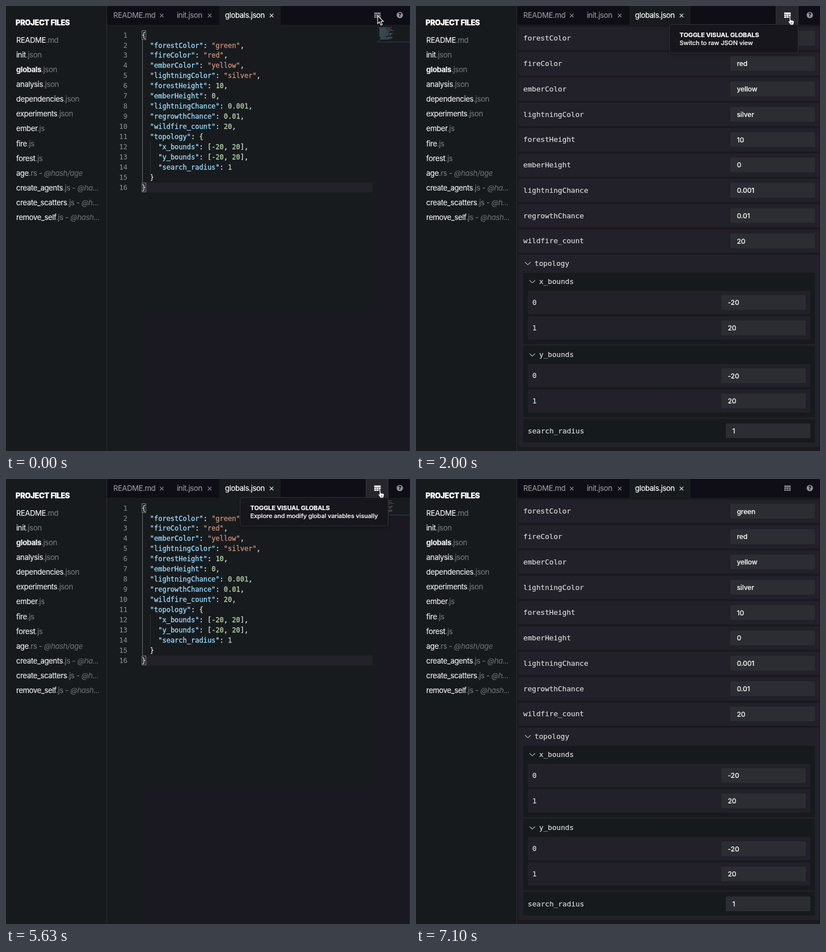
These frames come from a looping animation (712x786 px, 8.43 s). An HTML page:

```html
<!DOCTYPE html>
<html lang="en">
<head>
<meta charset="utf-8">
<title>Visual globals</title>
<style>
html, body { margin: 0; width: 100%; height: 100%; overflow: hidden; background: #161a1d; }
svg { display: block; width: 712px; height: 786px; }
text { font: 13px Inter, sans-serif; letter-spacing: -.3px; white-space: pre; color: #ececee; stroke-width: .2px; }
text, tspan { fill: currentColor; stroke: currentColor; }
.head { font-weight: 800; color: #fff; stroke-width: .4px; }
.bold { font-weight: 700; }
.ext { color: #707477; }
.path { color: #65696c; font-style: italic; }
.tab { color: #929297; }
.on { color: #fff; }
.mono { font: 12.7px "DejaVu Sans Mono", monospace; letter-spacing: 0; color: #d9d9dc; }
.code { font: 12px "DejaVu Sans Mono", monospace; letter-spacing: 0; color: #dcdcdc; stroke-width: .32px; }
.num { color: #82868a; text-anchor: end; stroke-width: .15px; }
.value { font-size: 12px; font-weight: 500; letter-spacing: -.1px; color: #f2f2f3; }
.tip { font-size: 11px; font-weight: 500; letter-spacing: -.12px; color: #f6f6f7; }
.tip.bold { font-weight: 700; color: #fff; }
.help { font-size: 9px; font-weight: 800; letter-spacing: 0; color: #0f0d15; text-anchor: middle; }

.json, .visual, .lines, .blank, .hover, .fade, .arrow, .hand, .cursor {
  animation: 8430ms step-end infinite;
}
.json { animation-name: json; }
.visual { animation-name: visual; }
.lines { animation-name: lines; }
.blank { animation-name: blank; }
.hover, .hand { animation-name: hover; }
.arrow { animation-name: arrow; }
.fade { animation-name: fade; animation-timing-function: linear; }
.cursor { animation-name: move; animation-timing-function: ease-in-out; }

@keyframes json { 0%, 42.705% { opacity: 1 } 16.607%, 67.26%, 100% { opacity: 0 } }
@keyframes visual { 0%, 42.705% { opacity: 0 } 16.607%, 67.26%, 100% { opacity: 1 } }
@keyframes lines { 0%, 43.06%, 100% { opacity: 1 } 42.705% { opacity: 0 } }
@keyframes blank { 0%, 43.06%, 100% { opacity: 0 } 42.705% { opacity: 1 } }
@keyframes hover { 0%, 83.037%, 100% { opacity: 0 } .356% { opacity: 1 } }
@keyframes arrow { 0%, 83.037% { opacity: 1 } .356%, 84.223%, 100% { opacity: 0 } }
@keyframes fade { 0%, .356%, 84.2%, 100% { opacity: 0 } 2.6%, 82.681% { opacity: 1 } }
@keyframes move {
  0% { transform: translate(655px, 17px) }
  5%, 77.936% { transform: translate(659px, 19.5px) }
  78.648%, 82.681% { transform: translate(658px, 18px) }
  84.223%, 100% { transform: translate(690px, -16px) }
}
</style>
</head>
<body>
<svg id="stage" viewBox="0 0 712 786"></svg>
<script>
const rect = (x, y, w, h, fill, more = '') =>
  `<rect x="${x}" y="${y}" width="${w}" height="${h}" fill="${fill}" ${more}/>`;
const text = (x, y, cls, body) => `<text x="${x}" y="${y}" class="${cls}">${body}</text>`;
const span = (cls, body) => `<tspan class="${cls}">${body}</tspan>`;
const line = (d, color, width = 1) => `<path d="${d}" fill="none" stroke="${color}" stroke-width="${width}"/>`;
const group = (cls, body) => `<g class="${cls}">${body}</g>`;

function sidebar() {
  const files = ['README.md', 'init.json', 'globals.json', 'analysis.json', 'dependencies.json',
    'experiments.json', 'ember.js', 'fire.js', 'forest.js', 'age.rs@hash/age',
    'create_agents.js@ha...', 'create_scatters.js@h...', 'remove_self.js@hash...'];
  const rows = files.map((file, i) => {
    const [, name, ext, path] = file.match(/^(\w+)(\.\w+)(@.*)?$/);
    const tail = path ? span('ext', ' - ') + span('path', path) : '';
    return text(18, 64.6 + i * 26.14, '', span(name === 'globals' ? 'bold' : '', name) + span('ext', ext) + tail);
  });
  return rect(0, 0, 177, 786, '#161a1d') + rect(177, 0, 1, 786, '#2c2d32') +
    text(17, 33.8, 'head', 'PROJECT FILES') + rows.join('');
}

function tableIcon(color) {
  let cells = rect(649, 11.5, 11.4, 3, color);
  for (let i = 0; i < 6; i++) {
    cells += rect(649 + i % 3 * 4, 15.3 + Math.floor(i / 3) * 3.2, 3.4, 2.5, color);
  }
  return cells;
}

function tabBar() {
  const tabs = [[189, 'README.md', 274.5], [301, 'init.json', 359], [386, 'globals.json', 468]];
  return rect(178, 0, 534, 33, '#0f0d15') + rect(376, 0, 108, 33, '#171b1e') +
    tabs.map(([x, name, close], i) =>
      text(x, 21, i === 2 ? 'on' : 'tab', name) +
      line(`M${close - 3.2} 13.6l6.4 6.4m0-6.4l-6.4 6.4`, i === 2 ? '#e8e8ea' : '#8c8c92', 1.1)).join('') +
    tableIcon('#85858b') +
    group('hover', rect(634, 0, 40, 33, '#26262c') +
      line('M634.5 0v33M673.5 0v33', '#36363c') + tableIcon('#fff')) +
    '<circle cx="694" cy="16" r="5.6" fill="#919196"/>' + text(694, 19.3, 'help', '?');
}

const source = `{
  "forestColor": "green",
  "fireColor": "red",
  "emberColor": "yellow",
  "lightningColor": "silver",
  "forestHeight": 10,
  "emberHeight": 0,
  "lightningChance": 0.001,
  "regrowthChance": 0.01,
  "wildfire_count": 20,
  "topology": {
    "x_bounds": [-20, 20],
    "y_bounds": [-20, 20],
    "search_radius": 1
  }
}`.split('\n');

function tokens(row) {
  const parts = row.match(/"[^"]*":?|-?\d[\d.]*|[^"\d-]+/g);
  return parts.flatMap(p => {
    if (p.endsWith('":')) return [[p.slice(0, -1), '#9cdcfe'], [':', '#dcdcdc']];
    return [[p, p[0] === '"' ? '#ce9178' : /\d/.test(p) ? '#b5cea8' : '#dcdcdc']];
  });
}

function minimap() {
  let marks = '';
  source.forEach((row, i) => {
    let x = 656;
    for (const [part, color] of tokens(row)) {
      const pad = part.length - part.trimStart().length;
      marks += rect(x + pad * .95, 36 + i * 1.68, (part.length - pad) * .95, 1.1, color, 'opacity=".36"');
      x += part.length * .95;
    }
  });
  return marks + rect(654, 63, 57, 1.2, '#1d3d57');
}

function editor() {
  const step = 17.93, left = 239.3;
  const bracket = y => rect(239.8, y - 8, 6.6, 16, 'none', 'stroke="#8a8c8e" stroke-width=".9"');
  const rows = source.map((row, i) => {
    const y = 55.6 + i * step;
    const body = tokens(row).map(([part, color]) => `<tspan style="color:${color}">${part}</tspan>`).join('');
    return text(214, y, 'code num', i + 1) + text(left, y, 'code', body);
  });
  return rect(178, 33, 534, 753, '#171b1e') +
    rect(240, 543, 472, 243, '#1a1921') + rect(650, 66, 62, 477, '#1a1921') +
    group('blank', rect(240, 290, 472, 253, '#1a1921') + rect(643.5, 33, 2, 753, '#121217')) +
    bracket(51.5) + rows[0] +
    group('lines', rect(240, 311.5, 406, 17.5, '#222228') +
      line('M240.5 60.5V311', '#6c7073') + line('M254.5 239.5V293', '#2e3336') +
      rows.slice(1).join('') + bracket(320.4) + minimap()) +
    rect(711, 33, 1, 753, '#2a282f');
}

function visualPanel() {
  const tone = '#222028', dark = '#161a1d';
  const field = (x, y, w, name, value, fill = tone) =>
    rect(x, y, w, 41.5, fill, 'rx="2"') + text(x + 8, y + 25, 'mono', name) +
    rect(x + w - 157, y + 7.7, 149, 26, '#2c2d32', 'rx="2"') +
    text(x + w - 145.5, y + 25.2, 'value', value);
  const fold = (x, y, name) =>
    line(`M${x} ${y - 2}l5 4.6 5-4.6`, '#b4b4b8', 1.1) + text(x + 17, y + 4, 'mono', name);
  const bounds = (y, name) =>
    rect(189, y, 514, 126, dark, 'rx="2"') + fold(200, y + 15.5, name) +
    field(197, y + 32, 498, '0', '-20') + field(197, y + 76.7, 498, '1', '20');
  const top = source.slice(1, 10).map((row, i) => {
    const [name, value] = row.replace(/[",\s]/g, '').split(':');
    return field(181, 36.4 + i * 44.75, 530, name, value);
  });
  return rect(178, 33, 534, 753, '#19191e') + top.join('') +
    rect(181, 439, 530, 340, tone, 'rx="2"') + fold(192, 454.5, 'topology') +
    bounds(471, 'x_bounds') + bounds(600.3, 'y_bounds') +
    field(189, 729.6, 514, 'search_radius', '1', dark);
}

function tooltip(x, note) {
  return rect(x + .5, 32.5, 673 - x, 50.5, '#14171a', 'rx="4" stroke="#303137" filter="url(#shade)"') +
    text(x + 18.6, 54.6, 'tip bold', 'TOGGLE VISUAL GLOBALS') + text(x + 18.6, 68.8, 'tip', note);
}

const arrow = '<path d="M0 0V14.2L3.3 11.2 5.7 16.8 8.2 15.7 5.8 10.3H10.2Z" fill="#111" stroke="#fff" stroke-width="1.1"/>';
const hand = '<path d="M-1 1.2a1.2 1.2 0 0 1 2.4 0V5.2l1.8.3 1.8.5 1.6.6q1 .5.8 1.8l-.6 3.2-.8 2.4h-5.4l-1.4-2.4-2.2-3q-.6-1.2.4-1.6.9-.2 1.6.9Z" fill="#fff" stroke="#111" stroke-width="1"/>' +
  line('M1.9 9v3M3.7 9v3', '#333', .7);

document.getElementById('stage').innerHTML =
  '<defs><filter id="shade" x="-10%" y="-20%" width="120%" height="160%">' +
  '<feDropShadow dx="0" dy="2" stdDeviation="2" flood-opacity=".3"/></filter></defs>' +
  group('json', editor()) + group('visual', visualPanel()) + sidebar() + tabBar() +
  group('fade',
    group('json', tooltip(412, 'Explore and modify global variables visually')) +
    group('visual', tooltip(446, 'Switch to raw JSON view'))) +
  group('cursor', group('arrow', arrow) + group('hand', hand));
</script>
</body>
</html>
```
